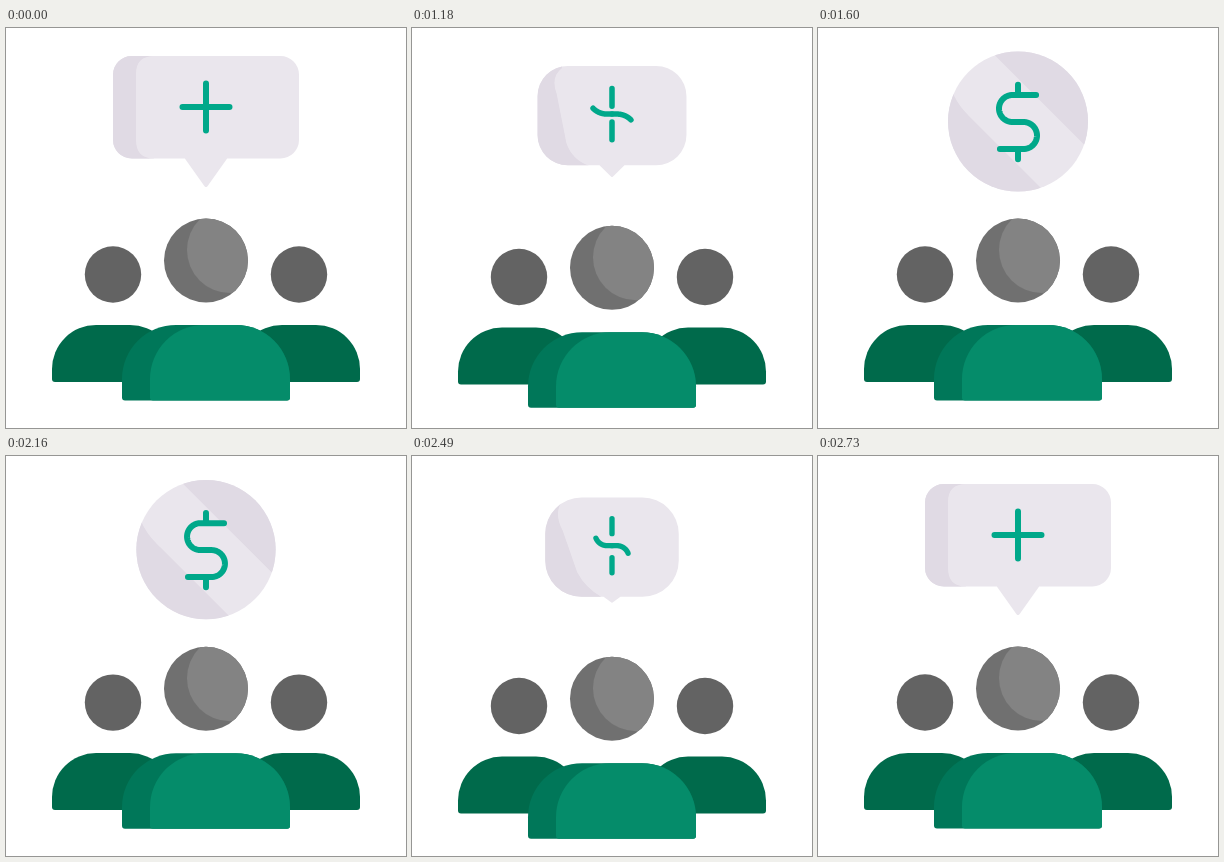
These frames come from a looping animation (400x400 px, 2.76 s). An HTML page with a canvas:

```html
<!DOCTYPE html>
<html>
<head>
<meta charset="utf-8">
<style>
html, body { margin: 0; width: 100%; height: 100%; overflow: hidden; background: #fff; }
canvas { display: block; width: 400px; height: 400px; }
</style>
</head>
<body>
<canvas id="stage" width="400" height="400"></canvas>
<script>
const ctx = document.getElementById('stage').getContext('2d');
const LOOP = 2760, STEP = 30, STEPS = 20;
const TO_COIN = 1000, TO_BUBBLE = 2130;
const PALE = '#eae6ed', SHADE = '#e0dae4', MINT = '#00a88a';

const clamp = (v, lo, hi) => Math.min(hi, Math.max(lo, v));
const lerp = (a, b, p) => a + (b - a) * p;
const stepsSince = (t, start) => clamp(Math.floor((t - start) / STEP), 0, STEPS);

function disc(x, y, r, color) {
  ctx.fillStyle = color;
  ctx.beginPath();
  ctx.arc(x, y, r, 0, 7);
  ctx.fill();
}

function torso(x, y, w, h, r, color) {
  ctx.fillStyle = color;
  ctx.beginPath();
  ctx.roundRect(x, y, w, h, [r, r, 3, 3]);
  ctx.fill();
}

function drawPeople(dip) {
  const side = 3.9 * dip, mid = 11.2 * dip;
  for (const x of [107, 293]) {
    disc(x, 246.5 + side, 28.2, '#636363');
    torso(x - 61, 297 + side, 122, 57, 44, '#006a4b');
  }
  ctx.save();
  ctx.translate(0, mid);
  torso(116, 297, 168, 75.5, 54, '#007759');
  torso(144, 297, 140, 75.5, 54, '#058c6a');
  disc(200, 232.5, 42, '#707070');
  ctx.clip();
  disc(224, 222, 43, '#838383');
  ctx.restore();
}

// Speech bubble (p = 0) turning into a coin (p = 1)
function drawBadge(p, dip) {
  const mix = (x0, y0, x1, y1) => [lerp(x0, x1, p), lerp(y0, y1, p)];
  const w = lerp(186, 140, p), top = lerp(28, 23.5, p), bottom = lerp(130.5, 163.5, p);
  const tail = 21.5 * (1 - p), tip = bottom + 29 * (1 - p) ** 1.9;
  const s = 1 - 0.2 * dip;

  ctx.save();
  ctx.translate(200, 93.5 + 3.9 * dip);
  ctx.scale(s, s);
  ctx.translate(-200, -93.5);

  ctx.beginPath();
  ctx.roundRect(200 - w / 2, top, w, bottom - top, lerp(18.5, 70, p));
  if (p < 1) {
    ctx.moveTo(200 + tail, bottom - 0.5);
    ctx.lineTo(200 + tail * 0.06, tip - 1);
    ctx.quadraticCurveTo(200, tip, 200 - tail * 0.06, tip - 1);
    ctx.lineTo(200 - tail, bottom - 0.5);
    ctx.closePath();
  }
  ctx.fillStyle = PALE;
  ctx.fill();
  ctx.clip();

  // Left shade: a side strip that tilts into a diagonal
  const start = mix(148, 28, 130, 32), end = mix(148, 130.5, 228, 165);
  ctx.fillStyle = SHADE;
  ctx.beginPath();
  ctx.moveTo(60, 0);
  ctx.lineTo(start[0], 0);
  ctx.lineTo(...start);
  ctx.quadraticCurveTo(...mix(130, 28, 127, 64), ...mix(130, 46, 150, 87));
  ctx.lineTo(...mix(130, 112, 185, 122));
  ctx.quadraticCurveTo(...mix(130, 130.5, 205, 142), ...end);
  ctx.lineTo(end[0], 200);
  ctx.lineTo(60, 200);
  ctx.fill();

  // Upper right shade slides in along the other diagonal
  const edge = 149.5 + 165 * (1 - p);
  ctx.beginPath();
  ctx.moveTo(edge, 0);
  ctx.lineTo(edge + 200, 200);
  ctx.lineTo(edge + 200, 0);
  ctx.fill();
  ctx.restore();
}

// Plus sign (p = 0) bending into a dollar sign (p = 1)
function drawSign(p, dip) {
  const flat = 5.5, r = 13.5, bend = Math.min(1, 2 * p);
  const length = p < 0.5 ? lerp(23.5, 21.5, 2 * p) : 21.5 + 50 * (2 * p - 1) ** 2.2;
  const s = 1 - 0.12 * dip, n = 120, d = length / n;

  ctx.save();
  ctx.translate(200, lerp(79, 94, p) + 3.5 * dip);
  ctx.scale(s, s);
  ctx.strokeStyle = MINT;
  ctx.lineWidth = 6;
  ctx.lineCap = ctx.lineJoin = 'round';
  for (let half = 0; half < 2; half++) {
    let x = 0, y = 0;
    ctx.beginPath();
    ctx.moveTo(0, lerp(0, 27, p));
    ctx.lineTo(0, lerp(23.5, 37.2, p));
    ctx.moveTo(0, 0);
    for (let i = 0; i < n; i++) {
      const a = bend * clamp((i + 0.5) * d - flat, 0, Math.PI * r) / r;
      ctx.lineTo(x += d * Math.cos(a), y += d * Math.sin(a));
    }
    ctx.stroke();
    ctx.rotate(Math.PI);
  }
  ctx.restore();
}

function draw(now) {
  const t = now % LOOP;
  const i = stepsSince(t, TO_COIN) - stepsSince(t, TO_BUBBLE);
  const u = Math.min(1, i / 16);
  const p = clamp(u - 0.08 * Math.sin(2 * Math.PI * u), 0, 1);
  const dip = (1 - Math.cos(2 * Math.PI * i / STEPS)) / 2;

  ctx.fillStyle = '#fff';
  ctx.fillRect(0, 0, 400, 400);
  drawPeople(dip);
  drawBadge(p, dip);
  drawSign(p, dip);
}

const begin = performance.now();
function loop() {
  draw(performance.now() - begin);
  requestAnimationFrame(loop);
}
loop();
</script>
</body>
</html>
```
